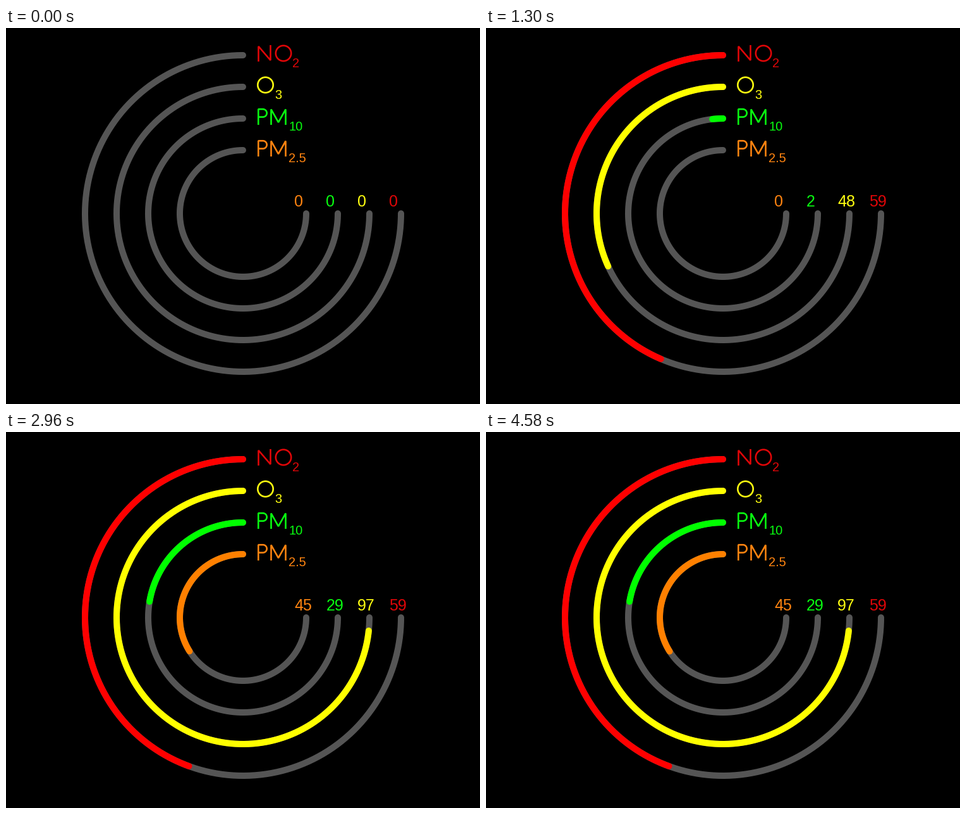
A matplotlib script for the animation above (4600 ms loop, 750x594 px).

```python
import numpy as np
import matplotlib.pyplot as plt
from matplotlib.animation import FuncAnimation

W, H, DPI = 750, 594, 100
PX = 72 / DPI
FRAMES, STEP = 230, 20
CX, CY = 375, 293
FONT = "Liberation Sans"

# radius, sweep, total, ring colour, text colour,
# arc start and duration, counter start and duration (ms)
RINGS = [
    (250, 160.0, 59, "#ff0000", "#e00608", 0, 1443, 0, 1275),
    (200, 264.0, 97, "#ffff00", "#ffff10", 649, 1550, 600, 1408),
    (150, 80.4, 29, "#00ff00", "#08ff10", 1053, 1630, 1040, 1541),
    (100, 122.4, 45, "#ff8000", "#ff8410", 1448, 1550, 1400, 1450),
]

fig = plt.figure(figsize=(W / DPI, H / DPI), dpi=DPI, facecolor="black")
ax = fig.add_axes([0, 0, 1, 1])
ax.set_xlim(0, W)
ax.set_ylim(H, 0)
ax.axis("off")


def arc(radius, sweep):
    """Points running anticlockwise from the top."""
    a = np.radians(np.linspace(0, sweep, max(8, int(sweep * 1.5))))
    return CX - radius * np.sin(a), CY - radius * np.cos(a)


def stroke(xs, ys, color, width, cap="butt", join="miter"):
    return ax.plot(xs, ys, color=color, lw=width * PX,
                   solid_capstyle=cap, solid_joinstyle=join)[0]


def write(x, y, s, size, color):
    return ax.text(x, y, s, fontsize=size * PX, color=color,
                   family=FONT, ha="left", va="baseline")


def letter(ch, x, y, color):
    """Thin geometric capital, left edge at x, middle height at y."""
    top, bot = y - 13, y + 13
    if ch == "N":
        pts = [(1.5, bot), (1.5, top + 2), (20.5, bot - 2), (20.5, top)]
    elif ch == "M":
        pts = [(1.5, bot), (1.5, top + 1.5), (13, bot - 4),
               (24.5, top + 1.5), (24.5, bot)]
    elif ch == "P":
        a = np.linspace(-np.pi / 2, np.pi / 2, 30)
        bowl = [(8.5 + 6.2 * np.cos(t), top + 7.4 + 6.2 * np.sin(t)) for t in a]
        pts = [(1.3, bot), (1.3, top + 1.2)] + bowl + [(1.3, top + 13.6)]
    else:
        a = np.linspace(0, 2 * np.pi, 90)
        pts = [(13.5 + 12.2 * np.cos(t), y + 12.2 * np.sin(t)) for t in a]
    px, py = zip(*pts)
    stroke(np.array(px) + x, py, color, 2.6, join="bevel")


def label(letters, sub, sub_x, y, color):
    for ch, x in letters:
        letter(ch, x, y, color)
    write(sub_x, y + 22, sub, 20, color)


def swing(t, start, duration, power=1.0):
    x = min(max((t - start) / duration, 0), 1) ** power
    return (1 - np.cos(np.pi * x)) / 2


LABELS = [
    ([("N", 398), ("O", 425.5)], "2", 453),
    ([("O", 397)], "3", 425),
    ([("P", 398), ("M", 418)], "10", 447.5),
    ([("P", 398), ("M", 418)], "2.5", 447.5),
]

arcs, counters = [], []
for ring, (letters, sub, sub_x) in zip(RINGS, LABELS):
    radius, color, ink = ring[0], ring[3], ring[4]
    stroke(*arc(radius, 270), "#555555", 10, "round", "round")
    arcs.append(stroke([], [], color, 10, "round", "round"))
    label(letters, sub, sub_x, CY - radius - 3, ink)
    counters.append(write(CX + radius - 18.7, 282, "0", 25, ink))


def update(i):
    t = i * STEP
    for ring, line, text in zip(RINGS, arcs, counters):
        radius, sweep, total, _, _, a0, a_len, c0, c_len = ring
        p = swing(t, a0, a_len, 0.9)
        line.set_visible(p > 0)
        line.set_data(*arc(radius, sweep * p))
        text.set_text(str(int(round(total * swing(t, c0, c_len)))))
    return arcs + counters


anim = FuncAnimation(fig, update, frames=FRAMES, interval=STEP,
                     repeat=True, repeat_delay=0, blit=False)
plt.show()
```
